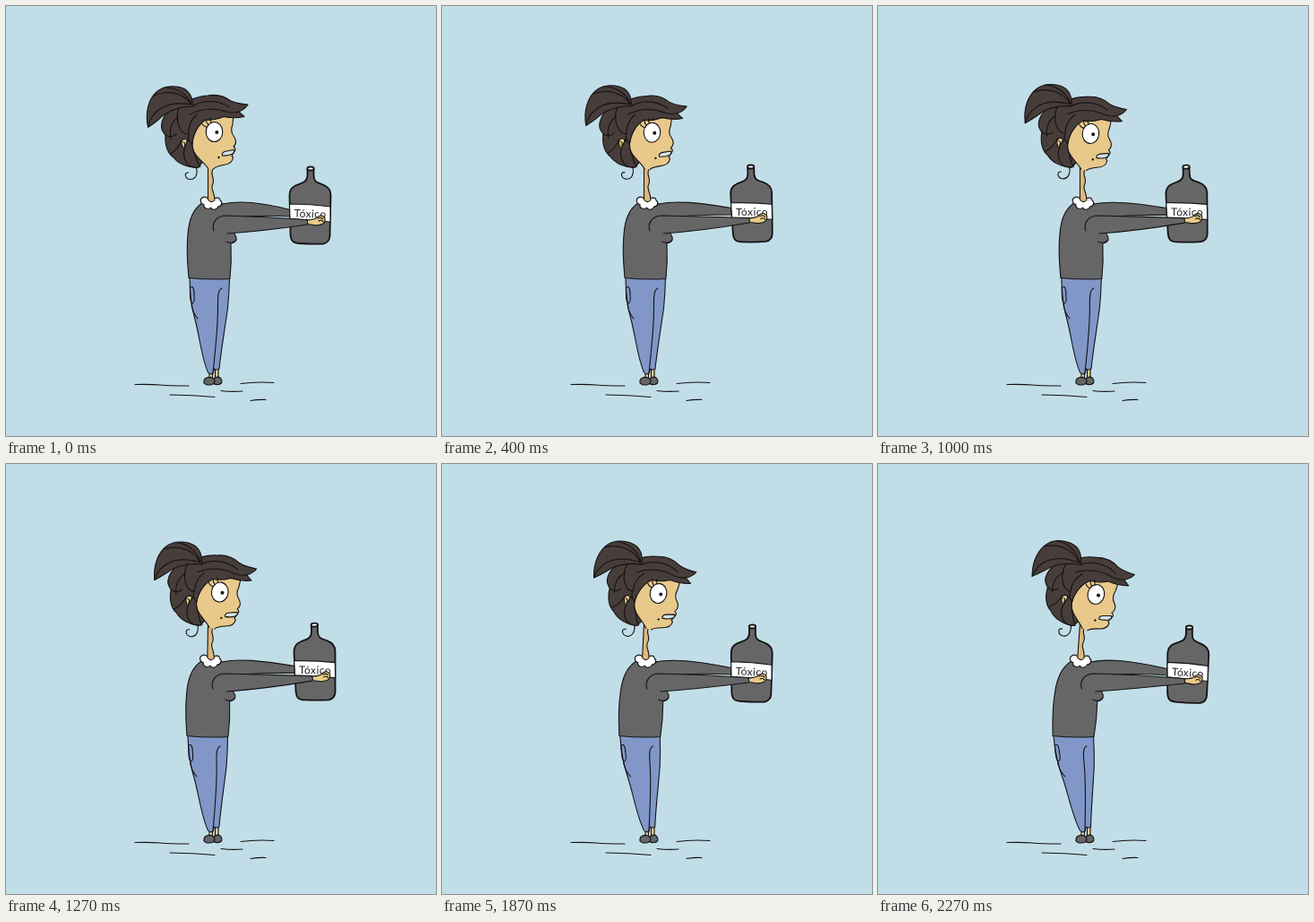
An HTML page for the animation above (2340 ms loop, 480 by 480 pixels).

```html
<!DOCTYPE html>
<html lang="es">
<head>
<meta charset="utf-8">
<style>
  html, body { margin: 0; width: 100%; height: 100%; overflow: hidden; background: #c1dee8; }
  svg { display: block; width: 100%; height: 100%; }
  path, ellipse, circle { stroke: #151313; stroke-width: 1.1; stroke-linejoin: round; stroke-linecap: round; }
  .line { fill: none; }
  .skin { fill: #e9c98a; }
  .neck { fill: #dfb878; }
  .hair { fill: #473d3a; }
  .wool { fill: #666667; }
  .jean { fill: #8097c8; }
  .white { fill: #fff; }
  .ink { fill: #151313; stroke: none; }
  .bold { stroke-width: 1.8; }
  text { font: 12px Lato, "Open Sans", sans-serif; letter-spacing: .4px; fill: #222; }
</style>
</head>
<body>
<svg viewBox="0 0 480 480">
  <path class="line" d="M144 422.500Q162 422 172 423T204 424M183 434Q208 434 233 436.500M240 429.500Q252 431 264 430M262 421.500Q280 419 299 420.500M273 440.500Q282 439 290 439.500"/>

  <g id="feet">
    <path class="skin" d="M227 403V417H230.500V403ZM233.500 401V415H237V401Z"/>
    <path class="wool" d="M231 419C231 415 236 413 239 415C242 418 242 422 237 422.500C233 423 231 422 231 419Z"/>
    <path class="wool" d="M221 419C221 415 226 413.500 230 415C234 417 234 421 230 422.500C225 424 220 422 221 419Z"/>
  </g>

  <g id="legs">
    <path class="jean" d="M205 303C205 322 207 336 211 350C216 368 218 392 225.500 409Q228 412 231 410L232.500 405Q235 407 238 405C240 385 245 356 247.500 337Q249 322 249.500 304Z"/>
    <path class="line" d="M241 315C236 317 236.500 326 236.500 337C236.500 360 234 380 231 410M205.500 314C209 312 210 316 210 322Q211 331 208 332Q205 332 205.500 314M207 333Q208 342 214 349"/>
  </g>

  <g id="torso">
    <path class="wool" d="M219 220C208 227 204 240 203 255C201 275 203 290 204 303.500Q228 306 250 304.500Q252 285 251 265Q258 264 257 258Q252 248 247 240L246 223L238 219Z"/>
    <path class="line" d="M246 263Q253 266.500 257 261"/>
    <path class="white" d="M219 214C216 216 217 221 221 221.500C220 226 226 228 228.500 225C231 229 236 227 236.500 224C241 224 242 219 239 217Q239 213 233 214.500Q229 217 225 214.500Q222 212 219 214Z"/>
    <path class="neck" d="M225.500 172V216Q229 221 233 216.500C233 209 229.500 206 230 201C232 197 232 194 230.500 190Q229 185 232 180V172Z"/>
  </g>

  <path id="farArm" class="wool"/>

  <g id="bottle">
    <path class="wool bold" d="M336.500 182V189C336.500 197 330 197.500 324 200Q316.500 203 316.500 211L317.500 255C318 262 320 264.500 327 265Q342 266 354 265.500Q361 264 361.500 257L362.500 211Q362.500 203 354 199.500C348 197 343.500 197 343.500 189V182Z"/>
    <ellipse class="white bold" cx="340" cy="181.500" rx="3.700" ry="2"/>
    <path class="white" d="M316.500 221Q340 221 362 224L362 241Q340 239 317 237.500Z"/>
    <text x="321.500" y="235.500" transform="rotate(2 321 236)">Tóxico</text>
  </g>

  <path id="nearArm" class="wool"/>

  <g id="hand">
    <path class="skin" d="M336 239Q343 238.500 346 237Q349 233.500 353 234L356 236.500Q356.500 241 354 243Q349 245.500 344 244.500L337 243.500Z"/>
    <path class="line" d="M348 237Q352 235 354 238M349 240Q352 238 354 241" stroke-width=".7"/>
  </g>

  <g id="head">
    <path class="line" d="M212 179C215 188 211 194 205.500 193.500C200 193 198 186 203.500 186"/>
    <path class="hair" d="M188 113C177 118 172 130 174 138Q176 142 178 144C177 156 181 165 187 169C192 176 203 181 215 180L230 160L228 116Z"/>
    <path class="skin" d="M231.500 182Q234 179 243 177.500Q253 176 253.500 169L252 167.500L255.500 161.500Q257 159 254 157C258 153 257 149 254 145Q250 140 253 132L254 122H222C212 135 207 147 208 158C210 168 219 172 225.500 181"/>
    <path d="M241.500 167Q240.500 164 244 162.500L254 160.500Q256 162 253 165Q248 167.500 241.500 167Z" fill="#d3e4e8"/>
    <path class="skin" d="M202 149C196 147 195 152 196.500 156Q198 161 202 159Z"/>
    <path class="line" d="M198 152Q201 153 199 157"/>
    <path class="hair" d="M203 150C198 158 197 168 201 174C205 181 213 181 217 179C213 175 213 171 211 166Q207 158 208 149Z"/>
    <path class="hair" d="M192 116C200 106 212 101 225 100C236 98 244 101 250 105.500Q257 109 270 110Q267 115 260 118Q263 121 266 123.500Q255 126 243 123.500Q232 128 223 127C215 132 209 142 208 154Q202 149 204 143C194 144 189 128 192 116Z"/>
    <path class="line" d="M208 112C220 104 238 105 249 113M205 121C217 115 232 113 246 118Q253 120 260 118M204 143Q203 130 213 121M192 124C184 130 182 138 184 148M178 144Q184 148 190 143M184 165Q192 160 196 150" stroke-width=".8"/>
    <path class="hair" d="M158.500 135.500C155 119 159 104 168 96C177 88 192 88.500 200 93Q207 98 208 107L209 112C192 112 179 118 170 127Q164 132 158.500 135.500Z"/>
    <path class="line" d="M158.500 135.500C162 117 178 105 207 110M165 100C180 93 198 97 206 109M177 91C190 91 202 98 207 109" stroke-width=".8"/>
    <ellipse class="white" cx="232.500" cy="140.500" rx="9.300" ry="11"/>
    <circle class="ink" cx="235.300" cy="141" r="2"/>
    <path class="line" d="M224.500 135Q221 135 219 131.500M226 133Q223.500 130 223 126.500M229.500 130.500Q227.500 128 228 125"/>
    <circle class="ink" cx="237.500" cy="169" r="1.200"/>
  </g>
</svg>
<script>
const LOOP = 2340, STEP = 200 / 3, LAST = 34;
const FEET_Y = 410, WAIST_Y = 304, NECK_Y = 178;
const BOTTLE_X = 339, BOTTLE_Y = 240;
// time, x shift, y shift, tilt in degrees
const carry = [
  [0, 0, 0, 0], [400, 6.7, -2, -2], [600, 5.8, -2, -2.2],
  [1530, 5.6, -1.8, -1], [1870, 6, 0, .5], [2280, 6, 1, 1.5]
];
const el = id => document.getElementById(id);
const move = (id, transform) => el(id).setAttribute("transform", transform);

// Horizontal lean: nothing at pivotY, shift at y
function lean(id, shift, y, pivotY) {
  const k = shift / (y - pivotY);
  move(id, `matrix(1 0 ${k} 1 ${-k * pivotY} 0)`);
}

function poseAt(t) {
  const i = Math.max(1, carry.findIndex(key => key[0] >= t));
  const a = carry[i - 1], b = carry[i], u = (t - a[0]) / (b[0] - a[0]);
  return a.slice(1).map((v, n) => v + (b[n + 1] - v) * u);
}

function draw(t) {
  const [dx, dy, tilt] = poseAt(t);
  const shift = -9 * Math.max(0, (t - 980) / 1290);
  const held = `translate(${dx} ${dy}) rotate(${tilt} ${BOTTLE_X} ${BOTTLE_Y})`;

  move("head", `rotate(${12 * t / 2270} 214 195)`);
  lean("torso", shift, WAIST_Y, NECK_Y);
  lean("legs", shift, WAIST_Y, FEET_Y);
  move("bottle", held);
  move("hand", held);

  const s = shift * .5, x = n => n + s, h = n => n + dx, v = n => n + dy;
  el("farArm").setAttribute("d",
    `M${x(242)} 221C${x(260)} 217 ${x(285)} 219 ${h(319)} ${v(228)}V${v(235)}Q${x(285)} 233 ${x(246)} 236`);
  el("nearArm").setAttribute("d",
    `M${x(232)} 251C${x(229)} 242 ${x(235)} 234 ${x(246)} 234Q${x(290)} 235 ${h(336)} ${v(238.5)}` +
    `Q${h(339)} ${v(241)} ${h(336)} ${v(244)}Q${x(290)} 251 ${x(247)} 254`);
}

function tick(now) {
  const t = now % LOOP;
  draw(Math.min(LAST, Math.floor((t + 4) / STEP)) * STEP);
  requestAnimationFrame(tick);
}
tick(performance.now());
</script>
</body>
</html>
```
